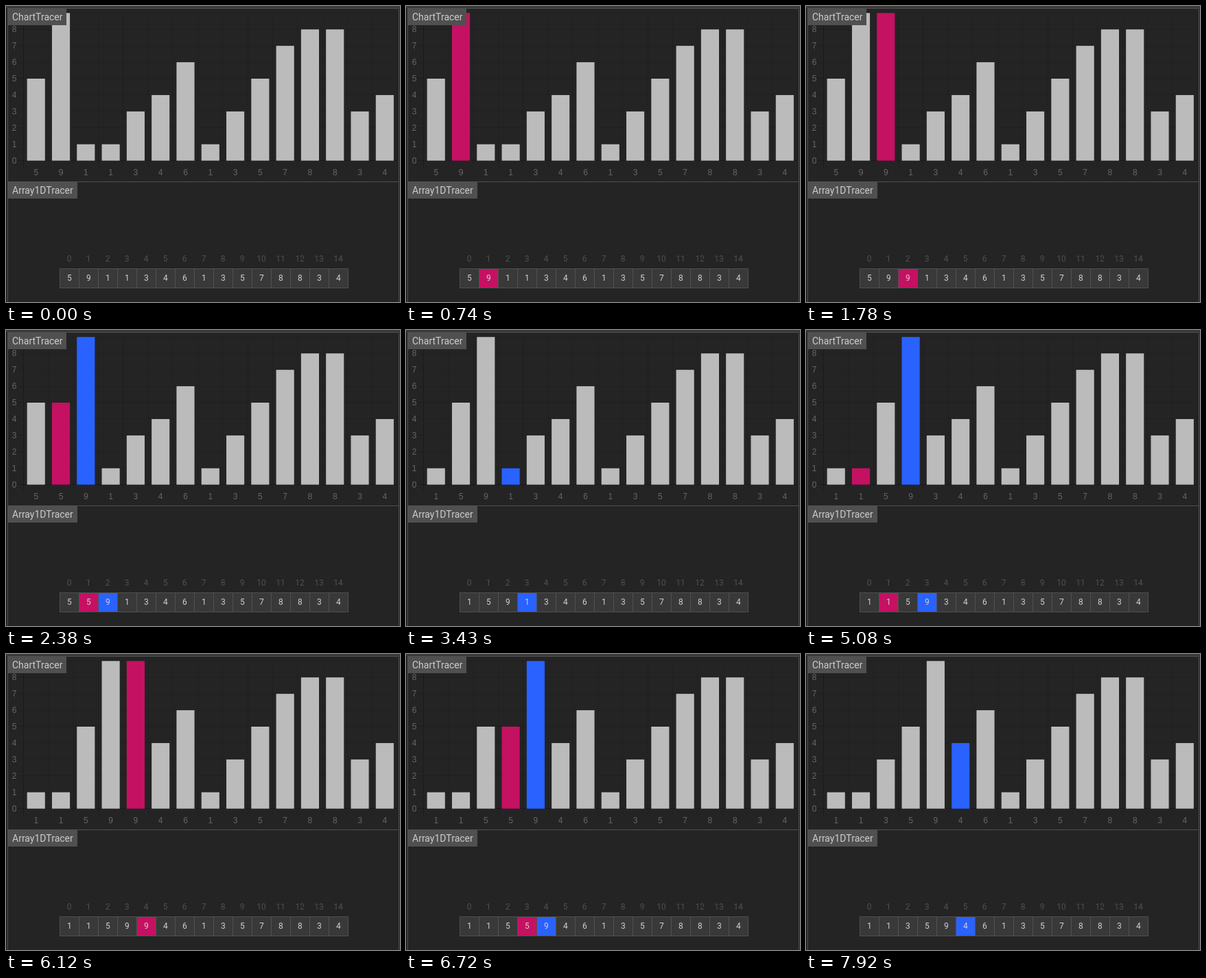
An HTML page for the animation above (8 s loop, 574 px wide and 432 px high).

```html
<!DOCTYPE html>
<html lang="en">
<head>
<meta charset="utf-8">
<title>Insertion sort tracer</title>
<style>
  html, body { margin: 0; width: 100%; height: 100%; overflow: hidden; background: #242424; }
  svg { display: block; width: 574px; height: 432px; }
  text { font: 12px Roboto, sans-serif; text-anchor: middle; fill: #d0d0d0; }
  .title { font-size: 14px; text-anchor: start; fill: #ccc; }
  .tick { font-family: "Liberation Sans", Arial, sans-serif; fill: #666; }
  .index { fill: #505050; }
  .grid { stroke: #000; stroke-opacity: .1; }
  .zero { stroke: #000; stroke-opacity: .25; }
</style>
</head>
<body>
<svg id="stage" viewBox="0 0 574 432"></svg>
<script>
const LOOP = 8000;
const START = [5, 9, 1, 1, 3, 4, 6, 1, 3, 5, 7, 8, 8, 3, 4];
const GREY = '#bbb', CELL = '#393939', LINE = '#505050';
const SELECT = '#2962ff', PATCH = '#c51162';

// time, selected index, patched index, patched value
const STEPS = [
  [0], [140, 1], [740, 1, 1, 9],
  [1180, 2], [1780, 2, 2, 9], [2380, 2, 1, 5], [2830, 2, 0, 1],
  [3430, 3], [4030, 3, 3, 9], [4480, 3, 2, 5], [5080, 3, 1, 1],
  [5670, 4], [6120, 4, 4, 9], [6720, 4, 3, 5], [7320, 4, 2, 3],
  [7920, 5]
];

const LEFT = 25.6, SLOT = 36.29, BAR = SLOT * 0.72;
const BASE = 225.7, UNIT = 23.94;
const stage = document.getElementById('stage');

function add(tag, attrs, content) {
  const el = document.createElementNS('http://www.w3.org/2000/svg', tag);
  for (const key in attrs) el.setAttribute(key, attrs[key]);
  if (content !== undefined) el.textContent = content;
  return stage.appendChild(el);
}
const rect = (x, y, width, height, fill) => add('rect', { x, y, width, height, fill });
const line = (x1, y1, x2, y2, name) => add('line', { x1, y1, x2, y2, class: name });
const label = (x, y, name, content) => add('text', { x, y, class: name }, content);
const snap = v => Math.floor(v) + 0.5;

// chart panel
rect(0, 0, 574, 3, CELL);
for (let v = 0; v <= 9; v++) {
  const y = BASE - v * UNIT;
  line(LEFT - 10, snap(y), 570, snap(y), v ? 'grid' : 'zero');
  if (v < 9) label(12.2, y + 4.1, 'tick', v);
}
for (let i = 0; i <= START.length; i++) {
  const x = snap(LEFT + i * SLOT);
  line(x, 10, x, 236, i ? 'grid' : 'zero');
}
const bars = START.map((v, i) => rect(LEFT + (i + 0.14) * SLOT, 0, BAR, 0, GREY));
const ticks = START.map((v, i) => label(LEFT + (i + 0.5) * SLOT, 246.5, 'tick', v));

// array panel
const cells = START.map((v, i) => rect(78 + i * 28, 383, 28, 28, CELL));
const values = START.map((v, i) => label(92.4 + i * 28, 401.3, 'value', v));
START.forEach((v, i) => label(92 + i * 28, 373.3, 'index', i));
for (let i = 0; i <= START.length; i++) rect(78 + i * 28, 383, 1, 29, LINE);
[383, 411].forEach(y => rect(78, y, 421, 1, LINE));

// panel borders and titles
[2, 572].forEach(x => rect(x, 3, 1, 429, LINE));
[3, 256].forEach(y => rect(2, y, 571, 1, LINE));
rect(3, 4, 85, 24, LINE);
label(9, 21, 'title', 'ChartTracer');
rect(3, 257, 101, 24, LINE);
label(9, 274, 'title', 'Array1DTracer');

function show(count) {
  const data = START.slice();
  const done = STEPS.slice(0, count);
  for (const [, , at, value] of done) if (at !== undefined) data[at] = value;
  const [, selected, patched] = done[count - 1];
  data.forEach((v, i) => {
    const mark = i === patched ? PATCH : i === selected ? SELECT : null;
    bars[i].setAttribute('y', BASE - v * UNIT);
    bars[i].setAttribute('height', v * UNIT);
    bars[i].setAttribute('fill', mark || GREY);
    cells[i].setAttribute('fill', mark || CELL);
    ticks[i].textContent = values[i].textContent = v;
  });
}

let shown = 0;
const begin = performance.now();
function tick() {
  const t = (performance.now() - begin) % LOOP;
  const count = STEPS.filter(step => step[0] <= t).length;
  if (count !== shown) show(shown = count);
  requestAnimationFrame(tick);
}
tick();
</script>
</body>
</html>
```
